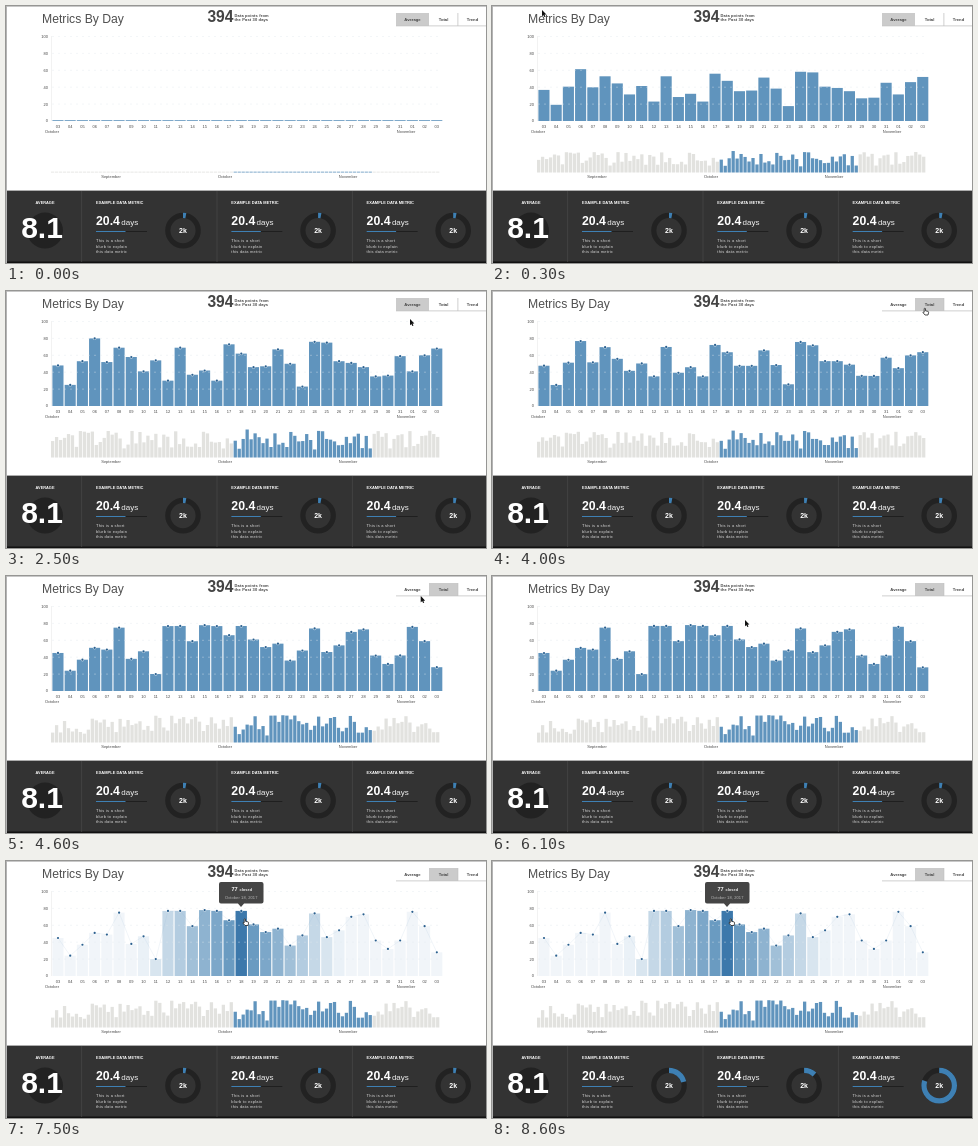
An HTML page with a canvas that plays this animation: 480 px wide and 257 px high, repeating every 8900 ms.

```html
<!DOCTYPE html>
<html lang="en">
<head>
<meta charset="utf-8">
<title>Metrics By Day</title>
<style>
html, body { margin: 0; width: 100%; height: 100%; overflow: hidden; background: #fff; }
canvas { display: block; }
</style>
</head>
<body>
<canvas id="stage" width="480" height="257"></canvas>
<script>
const c = document.getElementById('stage').getContext('2d');
const LOOP = 8900, BASE = 115, UNIT = 0.845, X0 = 52, STEP = 12.22, HOVERED = 15;
const BLUE = '#6094bd', ARC = '#3e80b4';

const average = [48, 25, 53, 80, 52, 69, 58, 41, 54, 30, 69, 37, 42, 30, 73, 62,
  46, 47, 67, 50, 23, 76, 75, 53, 51, 46, 35, 36, 59, 41, 60, 68];
const total = [45, 24, 37, 51, 49, 75, 38, 47, 20, 77, 77, 59, 78, 77, 66, 77,
  61, 52, 56, 36, 48, 74, 46, 54, 70, 73, 42, 32, 42, 76, 59, 28];

// time, x, y of the pointer tip
const pointerPath = [[100, 29, 0], [300, 50, 4], [900, 94, 43], [1800, 311, 26], [2500, 404, 28],
  [2700, 421, 24], [3300, 431, 17], [4400, 431, 17], [5300, 358, 31], [6100, 253, 44],
  [6200, 251, 44], [7100, 237, 57.5]];
const ringPath = [[7700, 0], [8000, 0.42], [8200, 0.47], [8300, 0.47], [8600, 1]];

const clamp = v => Math.max(0, Math.min(1, v));
const mix = (a, b, p) => a + (b - a) * p;
const easeInOut = p => p < 0.5 ? 4 * p ** 3 : 1 - 4 * (1 - p) ** 3;
const noise = n => { const v = Math.sin(n * 12.9898 + 4) * 43758.5453; return v - Math.floor(v); };
const barX = i => X0 + i * STEP;
const barY = v => BASE - v * UNIT;

function along(keys, t) {
  if (t <= keys[0][0]) return keys[0].slice(1);
  for (let i = 1; i < keys.length; i++) {
    const a = keys[i - 1], b = keys[i];
    if (t <= b[0]) return a.slice(1).map((v, k) => mix(v, b[k + 1], (t - a[0]) / (b[0] - a[0])));
  }
  return keys[keys.length - 1].slice(1);
}

function rect(x, y, w, h, color) {
  c.fillStyle = color;
  c.fillRect(x, y, w, h);
}

function disc(x, y, r, color) {
  c.fillStyle = color;
  c.beginPath();
  c.arc(x, y, r, 0, 7);
  c.fill();
}

// an empty bar still shows as a hairline
function bar(x, base, w, h, color) {
  const tall = Math.max(h, 0.8);
  rect(x, base - tall, w, tall, color);
}

function text(s, x, y, size, { color = '#444', bold = false, align = 'left', gap = 0 } = {}) {
  c.font = `${bold ? 'bold ' : ''}${size}px "Liberation Sans", Arial, sans-serif`;
  c.letterSpacing = gap + 'px';
  c.textAlign = align;
  c.fillStyle = color;
  c.fillText(s, x, y);
}

function drawHeader(t) {
  rect(0, 0, 480, 1, '#c8c8c8');
  text('Metrics By Day', 36, 17, 12.2, { color: '#505050' });
  text('394', 201.4, 15.5, 15.6, { bold: true });
  text('Data points from', 228.5, 10.6, 4, { bold: true, gap: 0.15 });
  text('the Past 30 days', 228.5, 14.9, 4, { bold: true, gap: 0.15 });

  const selected = t < 3800 ? 0 : 1;
  [['Average', 390, 423], ['Total', 423, 452], ['Trend', 452, 481]].forEach(([label, a, b], i) => {
    if (i === selected) rect(a, 7, b - a, 13, '#cbcbcb');
    rect(a, 19.5, b - a, 0.8, '#c4c4c4');
    text(label, (a + b) / 2, 15, 4.2, { bold: true, align: 'center' });
  });
  rect(451.5, 7, 0.8, 13, '#c4c4c4');
}

function drawChart(values, t, hover) {
  if (hover) {
    c.beginPath();
    values.forEach((v, i) => c.lineTo(barX(i), barY(v)));
    c.strokeStyle = `rgba(215,227,237,${hover * 0.7})`;
    c.lineWidth = 0.5;
    c.stroke();
  }
  values.forEach((v, i) => {
    const d = Math.abs(i - HOVERED);
    const paint = color => bar(barX(i) - 5.6, BASE, 11.1, v * UNIT, color);
    c.globalAlpha = mix(1, d ? Math.max(0.09, 1.05 - 0.115 * d) : 1, hover);
    paint(BLUE);
    if (!d && hover) {
      c.globalAlpha = hover;
      paint('#3c78ab');
    }
  });
  c.globalAlpha = 1;

  c.lineWidth = 0.5;
  c.strokeStyle = 'rgba(222,230,236,.75)';
  c.setLineDash([2, 4]);
  for (let v = 0; v <= 100; v += 20) {
    c.beginPath();
    c.moveTo(46, barY(v));
    c.lineTo(436, barY(v));
    if (v) c.stroke();
    text(v, 42, barY(v) + 1.4, 4, { align: 'right' });
  }
  c.setLineDash([]);
  rect(45, 30, 0.5, 85, '#e4e4e4');

  if (t >= 600) values.forEach((v, i) => {
    disc(barX(i), barY(v), 1.7, 'rgba(255,255,255,.6)');
    disc(barX(i), barY(v), 1.1, '#2b608f');
  });
  values.forEach((v, i) => {
    const day = i < 29 ? i + 3 : i - 28;
    text(String(day).padStart(2, '0'), barX(i), 121.5, 4, { align: 'center' });
  });
  text('October', 46, 127.3, 4, { align: 'center' });
  text('November', 400, 127.3, 4, { align: 'center' });
}

function drawOverview(values, grow, change) {
  const pitch = 3.97;
  for (let i = 0; i < 98; i++) {
    const k = i - 46, inside = k >= 0 && k < 35;
    const v = (inside && values[k]) ?? 0;
    const other = grow * (25 + 52 * mix(noise(i), noise(i + 100), change));
    const h = 0.35 * (inside && k < values.length ? v : other);
    bar(45 + i * pitch, 166.5, pitch - 0.7, h, inside ? BLUE : '#e2e2df');
  }
  text('September', 105, 172.3, 4, { align: 'center' });
  text('October', 219, 172.3, 4, { align: 'center' });
  text('November', 342, 172.3, 4, { align: 'center' });
}

function ring(x, y, share) {
  c.lineWidth = 5.2;
  const arc = (size, color) => {
    c.beginPath();
    c.arc(x, y, 15.2, -Math.PI / 2, (size * 2 - 0.5) * Math.PI);
    c.strokeStyle = color;
    c.stroke();
  };
  arc(1, '#222');
  arc(share, ARC);
  text('2k', x, y + 2.5, 7, { bold: true, color: '#fff', align: 'center' });
}

function drawPanel(t) {
  rect(0, 184.6, 480, 73, '#333');
  rect(0, 255.5, 480, 1.5, '#111');
  disc(39, 224.6, 18, '#222');
  text('AVERAGE', 39, 198.3, 3.9, { bold: true, color: '#fff', align: 'center' });
  text('8.1', 36, 232.3, 30, { bold: true, color: '#fff', align: 'center' });

  const p = along(ringPath, t)[0];
  [0.21, 0.12, 0.8].forEach((share, i) => {
    const x = 90 + i * 135.3;
    rect(x - 14.7, 185, 0.8, 71, '#464646');
    text('EXAMPLE DATA METRIC', x, 198.3, 4, { bold: true, color: '#fff' });
    text('20.4', x, 219.3, 12.3, { bold: true, color: '#fff' });
    text('days', x + 25.3, 219.3, 8, { color: '#f0f0f0' });
    rect(x, 225, 51, 1, '#1f1f1f');
    rect(x, 225, 29.5, 1, ARC);
    ['This is a short', 'blurb to explain', 'this data metric'].forEach((line, k) =>
      text(line, x, 236 + k * 5.5, 4, { color: '#ddd', gap: 0.25 }));
    ring(177 + i * 135.1, 224.6, mix(0.03, share, p));
  });
}

function drawTooltip(alpha) {
  if (!alpha) return;
  c.globalAlpha = alpha;
  c.fillStyle = '#454545';
  c.beginPath();
  c.roundRect(213, 21, 44.5, 21.5, 2);
  c.moveTo(231.5, 42);
  c.lineTo(238.5, 42);
  c.lineTo(235, 46);
  c.fill();
  text('77', 225.5, 29.8, 5.6, { bold: true, color: '#fff' });
  text('closed', 233.5, 29.8, 4, { bold: true, color: '#eee' });
  text('October 18, 2017', 235.2, 37.6, 4, { color: '#bbb', align: 'center', gap: 0.1 });
  c.globalAlpha = 1;
}

function drawPointer(t) {
  if (t < 100) return;
  const [x, y] = along(pointerPath, t);
  const hand = t >= 7000 || (x > 390 && y < 20);
  const arrow = 'M0 0V6.2L1.4 4.9L2.4 7L3.4 6.5L2.4 4.6H4.3Z';
  const finger = 'M1.2 .6Q1.9-.2 2.5.6V2.8L5 3.4Q5.8 3.7 5.6 4.6L5 7H2L0 4.6Q-.3 3.8 1.2 4.2Z';
  const shape = new Path2D(hand ? finger : arrow);
  c.save();
  c.translate(x, y);
  c.lineWidth = 0.8;
  c.strokeStyle = hand ? '#222' : '#fff';
  c.fillStyle = hand ? '#fff' : '#111';
  c.fill(shape);
  c.stroke(shape);
  if (!hand) c.fill(shape);
  c.restore();
}

function draw(now) {
  // the picture advances ten times a second
  const t = Math.min(8600, Math.floor(now % LOOP / 100) * 100);
  const grow = easeInOut(clamp(t / 490));
  const change = easeInOut(clamp((t - 3700) / 1000));
  const values = average.map((v, i) => grow * mix(v, total[i], change));

  rect(0, 0, 480, 257, '#fff');
  drawHeader(t);
  drawChart(values, t, clamp((t - 7000) / 300));
  drawOverview(values, grow, change);
  drawPanel(t);
  rect(0, 0, 1, 257, '#b4b4b4');
  drawTooltip(clamp((t - 7100) / 200));
  drawPointer(t);
}

let start;
function tick(now) {
  start ??= now;
  draw(now - start);
  requestAnimationFrame(tick);
}
draw(0);
requestAnimationFrame(tick);
</script>
</body>
</html>
```
